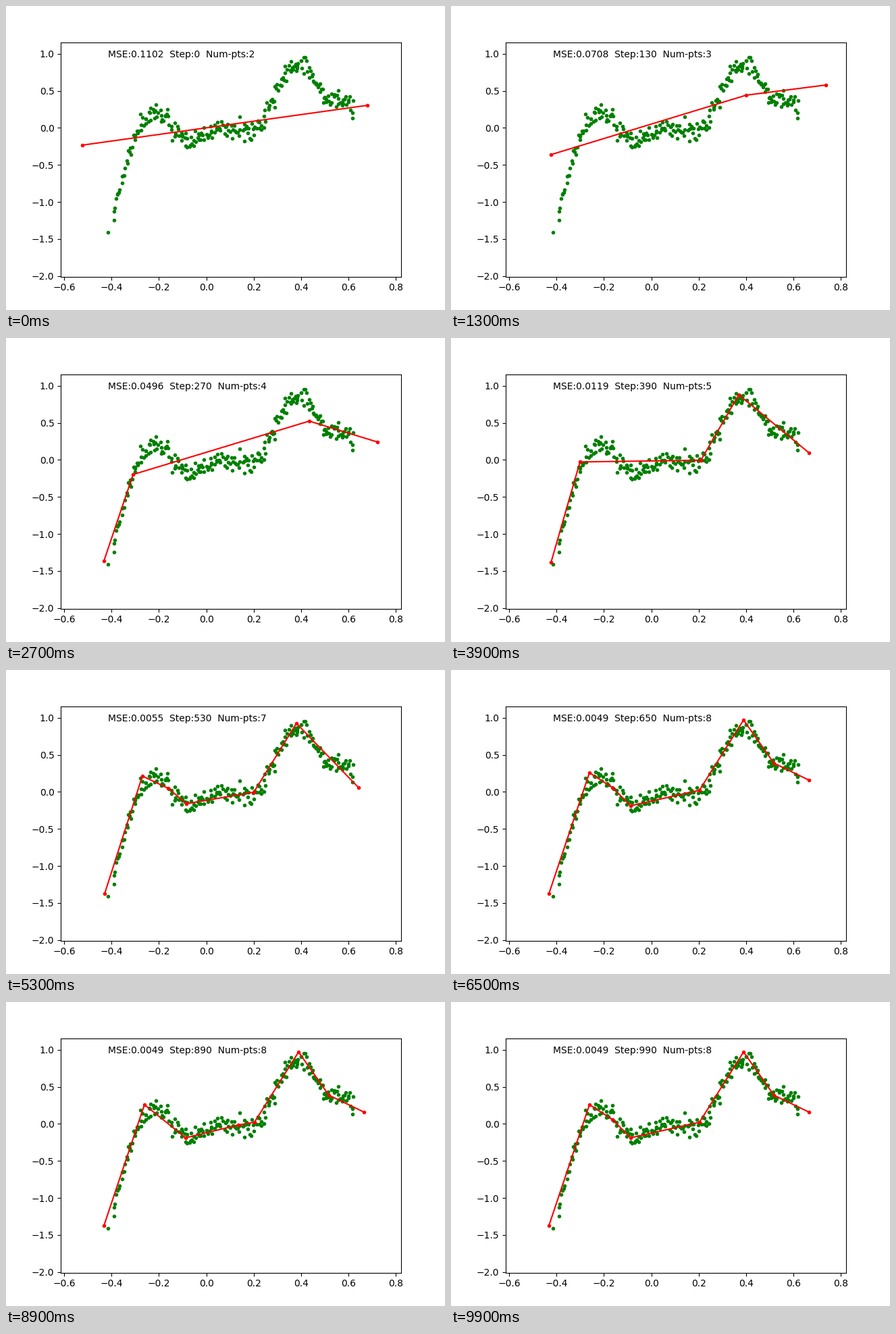
A matplotlib script for the animation above (10000 ms loop, 650 by 450 pixels).

```python
import numpy as np
import matplotlib.pyplot as plt
from matplotlib.animation import FuncAnimation

FRAMES, INTERVAL = 100, 100
LEFT, TOP = -.415, .952

# Turning points of the curve behind the noisy samples
TREND = np.array([
    (LEFT, -1.41), (-.34, -.55), (-.295, -.08), (-.26, .12), (-.215, .2),
    (-.18, .15), (-.14, -.03), (-.07, -.18), (.03, -.04), (.2, 0),
    (.25, .2), (.33, .72), (.39, .89), (.43, .8), (.51, .43), (.625, .27)])


def make_samples(n=244, spread=.068):
    rng = np.random.default_rng(4)
    x = np.linspace(-.394, .622, n) + rng.uniform(-.006, .006, n)
    y = np.interp(x, *TREND.T) + np.clip(rng.normal(0, spread, n), -.17, .17)
    return np.r_[LEFT, x], np.r_[TREND[0, 1], np.minimum(y, TOP)]


# Polylines the fit settles on as it gains knots
TWO = [(-.523, -.233), (.679, .304)]
THREE = [(-.423, -.361), (.4, .441), (.736, .578)]
FOUR = [(-.432, -1.364), (-.309, -.197), (.434, .523), (.722, .241)]
FIVE = [(-.423, -1.382), (-.301, -.028), (.209, -.005), (.369, .879), (.665, .095)]
SEVEN = [(-.429, -1.373), (-.27, .213), (-.161, .049), (-.084, -.16),
         (.2, -.005), (.38, .924), (.642, .058)]
EIGHT = [(-.432, -1.373), (-.261, .259), (-.164, .058), (-.087, -.188),
         (.203, .022), (.389, .97), (.517, .387), (.665, .159)]
SIX = SEVEN[:2] + SEVEN[3:]
MOVED = EIGHT[:2] + [EIGHT[3], (.135, -.015)] + EIGHT[4:]

# (first frame, frames to settle, error, polyline)
STAGES = [(0, 1, .1102, TWO), (10, 3, .0708, THREE), (20, 5, .0496, FOUR),
          (30, 9, .0119, FIVE), (40, 6, .0071, SIX), (50, 3, .0055, SEVEN),
          (60, 6, .0049, EIGHT), (70, 6, .0049, MOVED), (90, 6, .0049, EIGHT)]


def resample(line, goal):
    """Put the goal's inner knots on the old line, keeping its two ends."""
    x = goal[:, 0].copy()
    x[[0, -1]] = line[[0, -1], 0]
    return np.column_stack([x, np.interp(x, *line.T)])


def state(i):
    """Polyline and error at frame i, easing out from the stage before."""
    k = max(j for j, stage in enumerate(STAGES) if stage[0] <= i)
    start, span, mse, goal = STAGES[k]
    goal = np.array(goal)
    if k == 0:
        return goal, mse
    _, _, old_mse, old = STAGES[k - 1]
    begin = resample(np.array(old), goal)
    rest = (1 - min((i - start) / span, 1)) ** 3
    return goal + (begin - goal) * rest, mse + (old_mse - mse) * rest


fig, ax = plt.subplots(figsize=(6.5, 4.5), dpi=100)
ax.plot(*make_samples(), "g.")
fit, = ax.plot([], [], "r.-")
label = ax.text(LEFT, TOP, "")
ax.set_xlim(-.6136, .8216)
ax.set_ylim(-2.0064, 1.1522)


def update(i):
    pts, mse = state(i)
    fit.set_data(*pts.T)
    label.set_text(f"MSE:{mse:.4f}  Step:{i * 10}  Num-pts:{len(pts)}")
    return fit, label


anim = FuncAnimation(fig, update, frames=FRAMES, interval=INTERVAL,
                     repeat=True, repeat_delay=0)
plt.show()
```
